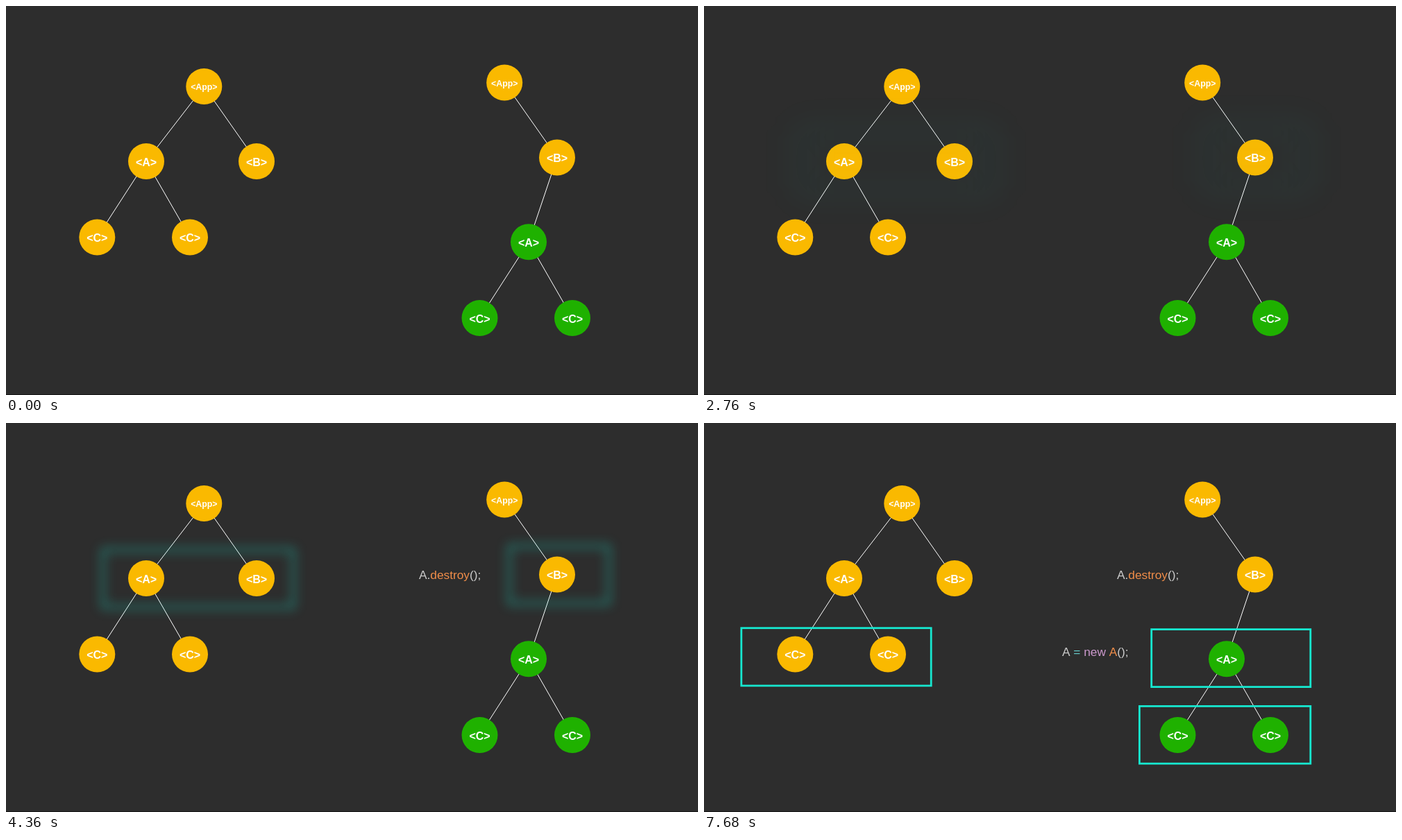
An HTML page with a canvas for the animation above (8000 ms loop, 997 px wide and 561 px high).

```html
<!DOCTYPE html>
<html lang="en">
<head>
<meta charset="utf-8">
<title>Tree diff</title>
<style>
  html, body { margin: 0; width: 100%; height: 100%; overflow: hidden; background: #2d2d2d; }
  canvas { display: block; }
</style>
</head>
<body>
<canvas id="stage" width="997" height="561"></canvas>
<script>
const ctx = document.getElementById('stage').getContext('2d');
const LOOP = 8000, STEP = 40;
const YELLOW = '#fab900', GREEN = '#1fb100', TEAL = '#16e7cf';
const GREY = '#cccccc', ORANGE = '#f08d49', PURPLE = '#cc99cd', CYAN = '#67cdcc';
const FONT = '"Liberation Sans", Arial, sans-serif';

// Each node: label, x, y, colour, index of its parent
const trees = [
  [
    ['<App>', 285.3, 116, YELLOW],
    ['<A>', 202, 224, YELLOW, 0],
    ['<B>', 361, 224, YELLOW, 0],
    ['<C>', 131.3, 333.5, YELLOW, 1],
    ['<C>', 265, 333.5, YELLOW, 1]
  ],
  [
    ['<App>', 718.2, 110.5, YELLOW],
    ['<B>', 794, 218.5, YELLOW, 0],
    ['<A>', 753, 340.3, GREEN, 1],
    ['<C>', 682.5, 450, GREEN, 2],
    ['<C>', 816, 450, GREEN, 2]
  ]
];

// Outer edges: left, top, right, bottom; sharp from "from" until "to"
const boxes = [
  { from: 960, to: 1480, rects: [[222, 69, 350, 154], [655, 69, 783, 154]] },
  { from: 2880, to: 4360, rects: [[138.3, 181.5, 415.5, 266.7], [723.7, 176.3, 869.7, 261.5]] },
  { from: 5760, to: LOOP, rects: [[52.4, 294.3, 328.6, 380.3], [643.3, 296.2, 875.2, 382]] },
  { from: 7680, to: LOOP, rects: [[626, 407, 875.2, 492.6]] }
];

const codes = [
  { from: 3840, x: 595, y: 225,
    parts: [['A.', GREY], ['destroy', ORANGE], ['();', GREY]] },
  { from: 6720, x: 516, y: 336,
    parts: [['A ', GREY], ['=', CYAN], [' ', GREY], ['new', PURPLE], [' ', GREY], ['A', ORANGE], ['();', GREY]] }
];

function drawTree(nodes) {
  ctx.strokeStyle = '#fff';
  ctx.lineWidth = 1;
  for (const [, x, y, , parent] of nodes) {
    if (parent === undefined) continue;
    ctx.beginPath();
    ctx.moveTo(nodes[parent][1], nodes[parent][2]);
    ctx.lineTo(x, y);
    ctx.stroke();
  }
  ctx.textAlign = 'center';
  for (const [label, x, y, color] of nodes) {
    ctx.fillStyle = color;
    ctx.beginPath();
    ctx.arc(x, y, 26, 0, Math.PI * 2);
    ctx.fill();
    const root = label === '<App>';
    ctx.font = `bold ${root ? 12.3 : 16}px ${FONT}`;
    ctx.fillStyle = '#fff';
    ctx.fillText(label, x, y + (root ? 5.2 : 6.8));
  }
}

// Distance from the sharp state, in steps
function softness(t, from, to = LOOP) {
  if (t < from) return (from - t) / STEP;
  return t < to ? 0 : (t - to) / STEP + 1;
}

function dissolve(k, radius, draw) {
  if (k >= 5) return;
  ctx.save();
  if (k > 0) {
    ctx.globalAlpha = 1 - k / 5;
    ctx.filter = `blur(${radius * k}px)`;
  }
  draw();
  ctx.restore();
}

function drawBox([left, top, right, bottom]) {
  const w = 2.8;
  ctx.strokeStyle = TEAL;
  ctx.lineWidth = w;
  ctx.strokeRect(left + w / 2, top + w / 2, right - left - w, bottom - top - w);
}

function drawCode({ x, y, parts }) {
  ctx.font = `17.3px ${FONT}`;
  ctx.textAlign = 'left';
  for (const [text, color] of parts) {
    ctx.fillStyle = color;
    ctx.fillText(text, x, y);
    x += ctx.measureText(text).width;
  }
}

function render(now) {
  const t = Math.floor((now % LOOP) / STEP) * STEP;
  ctx.fillStyle = '#2d2d2d';
  ctx.fillRect(0, 0, 997, 561);
  ctx.fillStyle = '#171717';
  ctx.fillRect(0, 560, 997, 1);
  ctx.fontKerning = 'none';
  trees.forEach(drawTree);
  for (const { from, to, rects } of boxes)
    dissolve(softness(t, from, to), 8, () => rects.forEach(drawBox));
  for (const code of codes)
    dissolve(softness(t, code.from), 6, () => drawCode(code));
}

const start = performance.now();
function tick() {
  render(performance.now() - start);
  requestAnimationFrame(tick);
}
tick();
</script>
</body>
</html>
```
